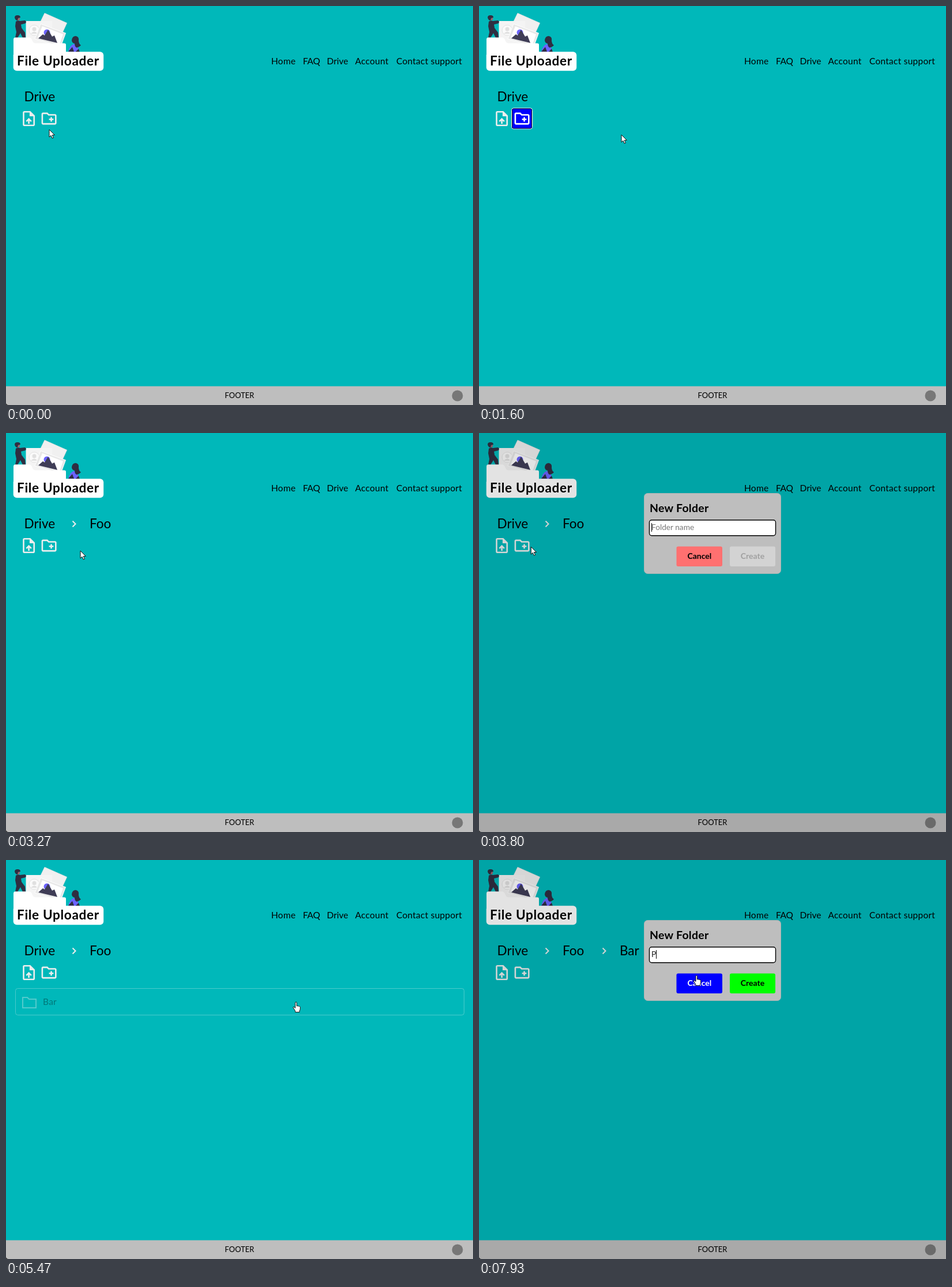
An HTML page for the animation above (8000 ms loop, 810 by 691 pixels).

```html
<!DOCTYPE html>
<html lang="en">
<head>
<meta charset="utf-8">
<title>File Uploader</title>
<style>
  html, body { margin: 0; height: 100%; overflow: hidden; background: #00b8ba; }
  svg { display: block; width: 810px; height: 691px; }
  text { font-family: Lato, sans-serif; font-size: 15.5px; letter-spacing: .25px; white-space: pre; }
  .crumb { font-size: 22.5px; letter-spacing: 0; }
  .bold { font-weight: 700; }
  .label { font-size: 14px; letter-spacing: 0; text-anchor: middle; }
  .field { font-size: 13.7px; letter-spacing: 0; }
  .chevron { fill: none; stroke: #eee; stroke-width: 2; }
  .blurred { filter: blur(.7px); }
</style>
</head>
<body>
<svg viewBox="0 0 810 691">
  <g id="page">
    <rect x="-9" y="-9" width="828" height="709" fill="#00b8ba"/>

    <g id="illustration">
      <path d="M67 12.500L105.500 29.500 97 48 58 31Z" fill="#f0f0f0" stroke="#e4e4e4"/>
      <path d="M34.500 26L80 26 80 68 34.500 66Z" fill="#f4f4f4"/>
      <circle cx="49" cy="42" r="9" fill="#fafafa" stroke="#e2e2e2"/>
      <circle cx="49" cy="40" r="3.500" fill="#e0e0e0"/>
      <path d="M43 48q6-7 12 0z" fill="#e0e0e0"/>
      <path d="M60 31L103.500 47 95 70 50 57Z" fill="#e8e8e8" stroke="#fff"/>
      <path d="M63 35L99 49 93 66 55 55Z" fill="#fff"/>
      <circle cx="71" cy="46" r="5.500" fill="#6c63ff"/>
      <path d="M56 56L64 49 67 51 73 41 80 53 84 51 89 64Z" fill="#3f3d56"/>
      <path d="M17 27q3-3 7-1l9-1 2 2-1 3-8 2 1 6 6 8 1 9h-5l-4-8-5 8h-4l2-10-2-10z" fill="#2f2e41"/>
      <circle cx="21" cy="22" r="3" fill="#a0616a"/>
      <path d="M15 20q0-4 5-4 5 0 5 4l-4 1-1 4q-4 0-5-5z" fill="#2f2e41"/>
      <path d="M108 80q2-11 9-14 8 0 10 14z" fill="#6c63ff"/>
      <path d="M114 59q1-7 7-7 6 1 5 8 0 5 4 8-4 4-8 4-3-2-3-7-5-1-5-6z" fill="#2f2e41"/>
      <path d="M108 79l7-8 3 8zM120 80l6-6 2 6z" fill="#2f2e41"/>
      <path d="M13 84V58q0-3.500 3-3.500H40q3 0 4.500 3l2.500 5q1 2 4 2H101q3 0 3 3V84Z" fill="#fff"/>
    </g>
    <rect x="12.700" y="79.300" width="156.500" height="33" rx="6" fill="#fff"/>
    <text class="bold" x="19" y="103" style="font-size:22.5px;letter-spacing:.7px">File Uploader</text>

    <text x="460" y="101">Home</text>
    <text x="515" y="101" style="letter-spacing:-.3px">FAQ</text>
    <text x="556.500" y="101" style="letter-spacing:0">Drive</text>
    <text x="605.500" y="101">Account</text>
    <text x="677" y="101">Contact support</text>

    <text class="crumb" x="31.500" y="165">Drive</text>
    <g id="crumbFoo">
      <path class="chevron" d="M115.500 152.500l5 5-5 5"/>
      <text class="crumb" x="145" y="165">Foo</text>
    </g>
    <g id="crumbBar">
      <path class="chevron" d="M214.500 152.500l5 5-5 5"/>
      <text class="crumb" x="244" y="165">Bar</text>
    </g>

    <rect id="hoverBox" x="57" y="178" width="35" height="34" rx="3" fill="#00f"/>
    <g id="focusRing" fill="#00f">
      <rect x="56.500" y="176.900" width="36" height="36" rx="3.500" stroke="#fff"/>
      <rect x="57.500" y="177.900" width="34" height="34" rx="2.500" stroke="#101010"/>
    </g>
    <g fill="#eee" fill-rule="evenodd">
      <path transform="translate(24 179.400) scale(1.3)" d="M14 2H6c-1.100 0-2 .9-2 2V20c0 1.100.9 2 2 2H18c1.100 0 2-.9 2-2V8l-6-6zm4 18H6V4h7v5h5v11zM8 15l1.400 1.400L11 14.800V19h2v-4.200l1.600 1.600L16 15 12 11 8 15z"/>
      <path id="folderIcon" transform="translate(59 179.400) scale(1.3)" d="M20 6h-8l-2-2H4c-1.100 0-2 .9-2 2V18c0 1.100.9 2 2 2h16c1.100 0 2-.9 2-2V8c0-1.100-.9-2-2-2zm0 12H4V6h5.200l2 2H20v10zm-8-4h2v2h2v-2h2v-2h-2v-2h-2v2h-2v2z"/>
    </g>

    <g id="row">
      <rect x="16.500" y="222.500" width="778" height="46" rx="4" fill="none" stroke="#d8eeee"/>
      <path d="M29 238h8l3 3h12v15h-23z" fill="none" stroke="#eee" stroke-width="2"/>
      <text id="rowName" x="64" y="251"></text>
    </g>

    <rect x="-9" y="658.500" width="828" height="41" fill="#bebebe"/>
    <text class="label" x="405" y="679" style="font-size:13px">FOOTER</text>
    <circle cx="783" cy="675" r="9.500" fill="#777"/>
  </g>

  <g id="dialog">
    <rect width="810" height="691" fill="#000" fill-opacity=".11"/>
    <rect x="286.500" y="104.500" width="237" height="139" rx="6" fill="#bebebe" stroke="#a9b4b4"/>
    <text class="bold" x="296" y="137" style="font-size:19.500px">New Folder</text>
    <rect id="inputBorder" x="295.500" y="150.800" width="219" height="27" rx="4" fill="#fff" stroke="#000" stroke-width="1.400"/>
    <g id="inputPlain">
      <rect x="296" y="152" width="218" height="26" rx="3" fill="#222"/>
      <rect x="296" y="151" width="218" height="26" rx="3" fill="#fff"/>
    </g>
    <text id="input" class="field" x="299" y="168"></text>
    <path id="caret" d="M.5 156v15" stroke="#000"/>
    <rect id="cancelBox" x="342.500" y="196.500" width="79.500" height="34.500" rx="3"/>
    <text id="cancelText" class="bold label" x="382.300" y="218">Cancel</text>
    <g id="create">
      <rect id="createBox" x="435" y="196.500" width="79" height="34.500" rx="3"/>
      <text id="createText" class="bold label" x="474.500" y="218">Create</text>
    </g>
  </g>

  <path d="M0 687.500q.5 3 4 3.500H0z" fill="#222"/>
  <g id="cursor" fill="#fff" stroke="#111">
    <path id="arrow" d="M0 0V13l3-2.800 2.200 4.900 2.200-1-2.200-4.700H9.300z"/>
    <path id="hand" d="M-2 1.500q0-1.500 1.300-1.500t1.300 1.500V7q1-1 2 .2 1.200-.8 2 .3 1.600-.5 2 1v4l-1.200 3v2H-2v-2L-5.500 10q-.7-1.600 1-1.600l2.500 2z"/>
  </g>
</svg>
<script>
const LOOP = 8000, FPS = 15;
const el = {};
document.querySelectorAll('[id]').forEach(node => el[node.id] = node);

// time, x, y of the pointer
const POINTER = [
  [0, 75, 214], [130, 73, 205], [400, 73, 205], [730, 247, 223], [2670, 247, 223],
  [3270, 129, 204], [3530, 75, 197], [3730, 75, 197], [4330, 480, 200], [5070, 480, 200],
  [5670, 512, 262], [5930, 515, 271], [6730, 81, 197], [6870, 81, 197], [7330, 378, 200]
];
// time and content of the name field
const TYPING = [
  [0, ''], [930, 'F'], [1330, 'Fo'], [1470, 'Foo'], [1600, ''],
  [4400, 'B'], [4600, 'Ba'], [4730, 'Bar'], [5070, ''], [7870, 'P']
];

const within = (t, from, to) => t >= from && t < to;
const show = (node, on) => node.style.display = on ? '' : 'none';
const inside = (p, x, y, w, h) => p.x >= x && p.x <= x + w && p.y >= y && p.y <= y + h;

function pointerAt(t) {
  const i = POINTER.findLastIndex(key => key[0] <= t);
  const a = POINTER[i], b = POINTER[i + 1] || a;
  const k = a === b ? 0 : (t - a[0]) / (b[0] - a[0]);
  const s = k * k * (3 - 2 * k);
  return { x: a[1] + (b[1] - a[1]) * s, y: a[2] + (b[2] - a[2]) * s };
}

function paint(box, label, fill, color) {
  box.setAttribute('fill', fill);
  label.setAttribute('fill', color);
}

function drawDialog(t, p) {
  const value = TYPING.findLast(key => key[0] <= t)[1];
  const pressed = within(t, 4930, 5070);
  const overCancel = inside(p, 342, 196, 80, 35);
  const overCreate = value && inside(p, 435, 196, 79, 35);

  el.input.textContent = value || 'Folder name';
  el.input.setAttribute('fill', value ? '#222' : '#777');
  const caretX = 299 + (value ? Math.round(el.input.getComputedTextLength()) : 0);
  el.caret.setAttribute('transform', `translate(${caretX})`);
  show(el.caret, !pressed);
  show(el.inputBorder, !pressed);
  show(el.inputPlain, pressed);

  paint(el.cancelBox, el.cancelText, overCancel ? '#00f' : '#ff7070', overCancel ? '#fff' : '#000');
  if (!value) paint(el.createBox, el.createText, '#d3d3d3', '#a0a0a0');
  else if (overCreate) paint(el.createBox, el.createText, '#00f', '#fff');
  else paint(el.createBox, el.createText, '#0f0', '#000');
  el.createBox.setAttribute('stroke', pressed ? '#000' : 'none');
  el.create.setAttribute('transform', `translate(0 ${pressed ? 1.3 : 0})`);
  return overCancel || overCreate;
}

function draw(t) {
  const p = pointerAt(t);
  const open = within(t, 270, 1600) || within(t, 3730, 5070) || t >= 6800;
  const focused = within(t, 1600, 2670);
  const hovered = !open && inside(p, 57, 178, 35, 34);
  const rowStart = t < 4000 ? 2400 : 5470;
  const rowShown = within(t, 2400, 2670) || within(t, 5470, 5800);

  show(el.crumbFoo, t >= 2670);
  show(el.crumbBar, t >= 5800);
  show(el.focusRing, focused);
  show(el.hoverBox, hovered);
  el.folderIcon.setAttribute('fill', hovered || focused ? '#fff' : '#eee');
  show(el.row, rowShown);
  el.row.setAttribute('opacity', Math.min(1, (t - rowStart + 70) / 200));
  el.rowName.textContent = t < 4000 ? 'Foo' : 'Bar';

  show(el.dialog, open);
  el.page.classList.toggle('blurred', open);
  const overButton = open && drawDialog(t, p);
  const pointing = overButton || rowShown && inside(p, 16, 222, 779, 47);
  show(el.arrow, !pointing);
  show(el.hand, pointing);
  el.cursor.setAttribute('transform', `translate(${p.x} ${p.y})`);
}

const start = performance.now();
function tick() {
  const elapsed = (performance.now() - start) % LOOP;
  const step = Math.floor(elapsed * FPS / 1000 + .1);
  draw(Math.round(step * 100 / FPS) * 10 % LOOP);
  requestAnimationFrame(tick);
}
tick();
</script>
</body>
</html>
```
